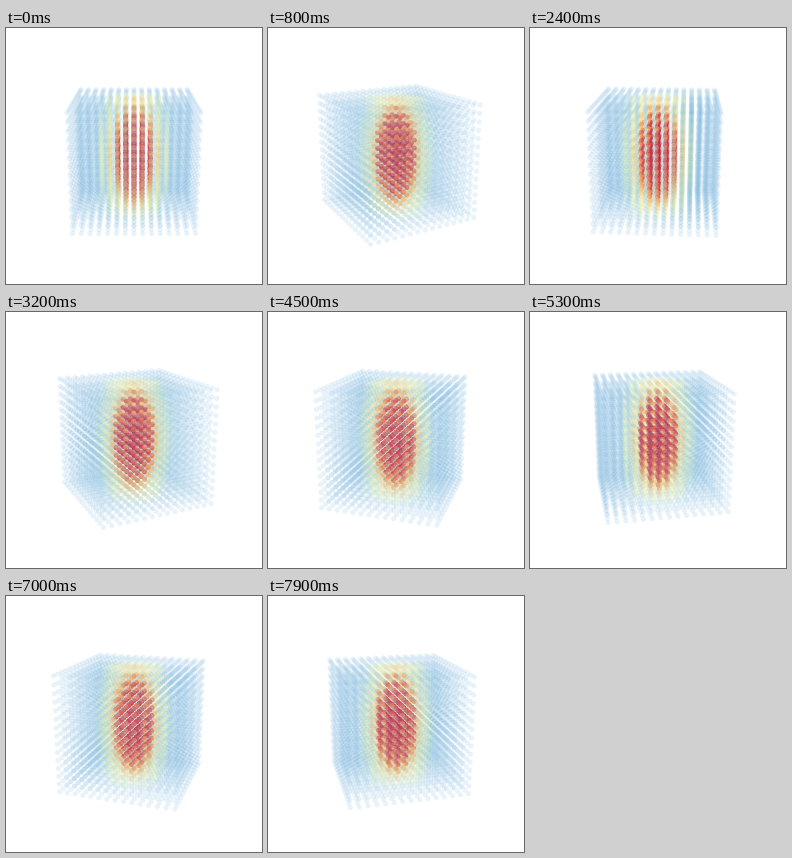
Animation of 256x256 px, one loop 8 s. Source, as a matplotlib script:

```python
import numpy as np
import matplotlib.pyplot as plt
from matplotlib.animation import FuncAnimation
from matplotlib.colors import LinearSegmentedColormap

SIZE, DPI = 256, 100
FRAMES, INTERVAL = 80, 100
STEP = np.radians(3.6)
ELEV = np.radians(18)
DIST = 8.4                                   # camera distance in half cube sides
FOCAL = SIZE / 2 / np.tan(np.radians(15))    # 30 degree view angle
DOT = 5.1                                    # dot diameter in pixels


def smooth(v, lo, hi):
    t = np.clip((v - lo) / (hi - lo), 0, 1)
    return t * t * (3 - 2 * t)


# Lattice and the elongated bump it samples
axis = np.linspace(-1, 1, 15)
x, y, z = (g.ravel() for g in np.meshgrid(axis, axis, axis))
value = np.exp(-0.3 * ((x**2 + y**2) / 0.36**2 + z**2 / 0.82**2))

cmap = LinearSegmentedColormap.from_list("field", [
    (0.0, "#70b0de"), (0.28, "#78b6dc"), (0.38, "#bfe3ae"),
    (0.46, "#e6f598"), (0.55, "#fff09c"), (0.64, "#fdc877"),
    (0.70, "#fba35c"), (0.75, "#ee6545"), (0.79, "#d53e4f"),
    (1.0, "#b8204a")])
colors = cmap(value)
colors[:, 3] = (0.15 + 0.12 * smooth(value, 0.3, 0.5)
                + 0.58 * smooth(value, 0.58, 0.76))


def project(angle):
    """Return pixel positions and camera depth for a turn about z."""
    c, s = np.cos(angle), np.sin(angle)
    side, near = x * c - y * s, -x * s - y * c
    depth = DIST - near * np.cos(ELEV) - z * np.sin(ELEV)
    up = z * np.cos(ELEV) - near * np.sin(ELEV)
    scale = FOCAL / depth
    return np.column_stack([SIZE / 2 + side * scale,
                            SIZE / 2 - up * scale]), depth


fig = plt.figure(figsize=(SIZE / DPI, SIZE / DPI), dpi=DPI, facecolor="white")
ax = fig.add_axes([0, 0, 1, 1])
ax.set(xlim=(0, SIZE), ylim=(SIZE, 0))
ax.axis("off")
dots = ax.scatter(x, y, s=(DOT * 72 / DPI)**2, c=colors, linewidths=0)


def update(i):
    pos, depth = project(i * STEP)
    order = np.argsort(-depth, kind="stable")    # far dots first
    dots.set_offsets(pos[order])
    dots.set_facecolors(colors[order])
    return dots,


anim = FuncAnimation(fig, update, frames=FRAMES, interval=INTERVAL,
                     repeat=True, repeat_delay=0)
plt.show()
```
